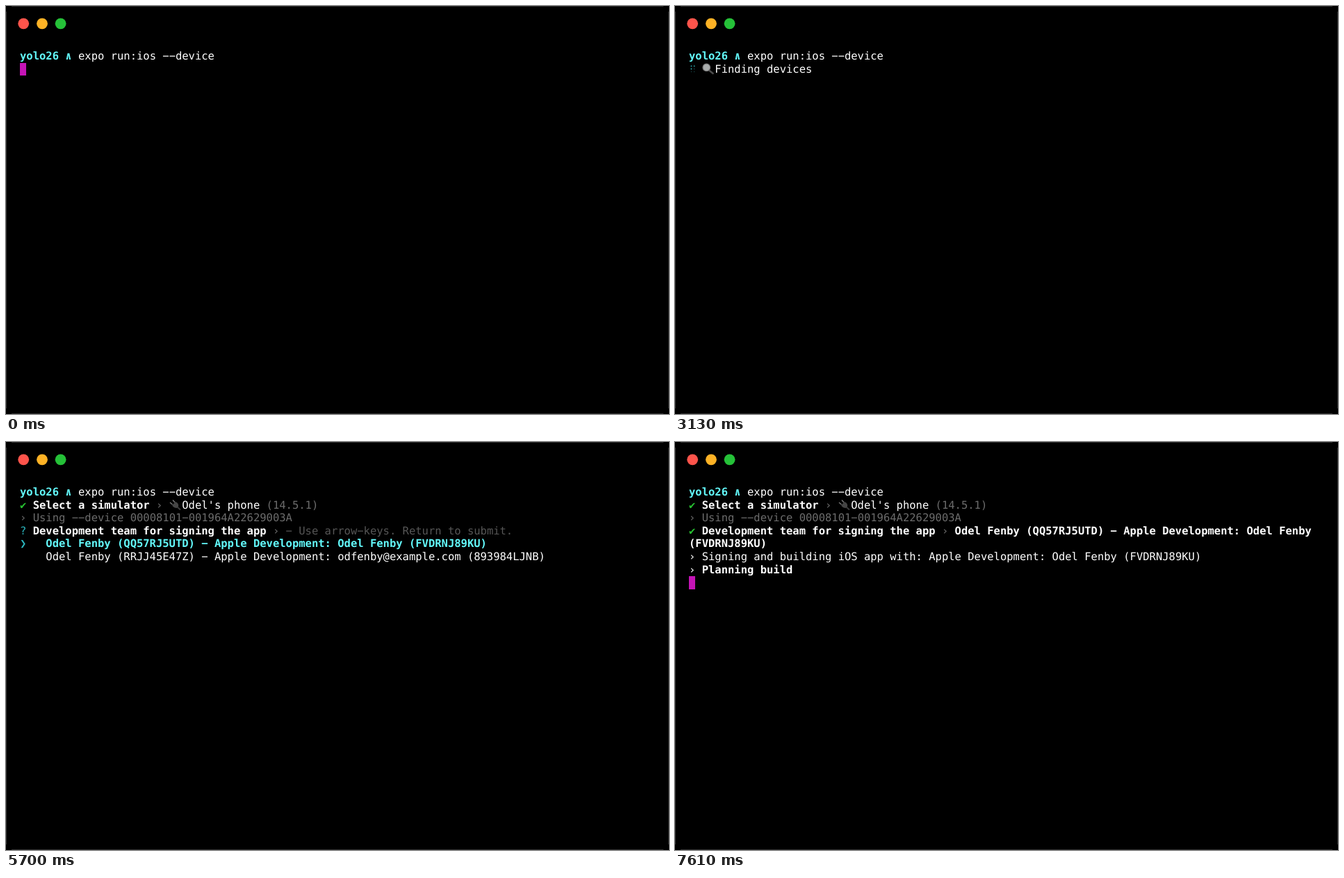
Write an HTML page that moves like this. It is 954x587 px and loops after 8 s.

```html
<!DOCTYPE html>
<html lang="en">
<head>
<meta charset="utf-8">
<title>Terminal</title>
<style>
  html, body { margin: 0; width: 100%; height: 100%; overflow: hidden; background: #000; }
  #stage { position: relative; width: 954px; height: 587px; overflow: hidden; background: #000; }
  #stage span, #stage svg { position: absolute; }
  #stage span {
    white-space: pre; color: #fff; text-rendering: geometricPrecision;
    font: 15.5px/18.6px "DejaVu Sans Mono", "DejaVu Sans", monospace;
  }
  #stage .b { font-weight: bold; }
  #stage .cyan { color: #62f8fa; }
  #stage .teal { color: #2bb5bd; }
  #stage .grey { color: #6c6c6c; }
  #stage .dim { color: #565656; }
  #stage .green { color: #27c031; }
  #stage .cursor { width: 9.3px; height: 18.6px; background: #c514b6; }
</style>
</head>
<body>
<div id="stage">
  <svg width="954" height="587">
    <path d="M8 .5H946M8 586.5H946M.5 8V579M953.5 8V579" stroke="#303030"/>
    <circle cx="25.2" cy="25.3" r="7.9" fill="#fe544b"/>
    <circle cx="52" cy="25.3" r="7.9" fill="#fdb225"/>
    <circle cx="78.6" cy="25.3" r="7.9" fill="#25c138"/>
  </svg>
  <div id="screen"></div>
</div>
<script>
const LOOP = 8000, COL = 9.3318, ROW = 18.6, LEFT = 20, TOP = 62.9;
const screen = document.getElementById('screen');

const person = 'Odel Fenby';
const signer = `Apple Development: ${person} (FVDRNJ89KU)`;
const teams = [
  `${person} (QQ57RJ5UTD) - ${signer}`,
  `${person} (RRJJ45E47Z) - Apple Development: odfenby@example.com (893984LJNB)`
];
const simulators = [
  'iPhone 12 Pro Max', 'iPhone 8', 'iPhone 8 Plus', 'iPhone 11', 'iPhone 11 Pro',
  'iPhone 11 Pro Max', 'iPad Pro (9.7-inch)', 'iPad Pro (11-inch) (2nd generation)',
  'iPad Pro (12.9-inch) (4th generation)', 'iPad (8th generation)'
];

const at = (row, col) => `style="left:${LEFT + col * COL}px;top:${TOP + row * ROW}px"`;
// Wide minus glyphs stand for the terminal font's long hyphens.
const text = (row, col, str, cls = '') =>
  `<span class="${cls}" ${at(row, col)}>${str.replace(/-/g, '\u2212')}</span>`;
const cursor = row => `<span class="cursor" ${at(row, 0)}></span>`;
const icon = (row, col, body) =>
  `<svg width="19" height="19" ${at(row, col)}>${body}</svg>`;

const lens = (row, col) => icon(row, col, `
  <path d="M10 10.5L15.6 15" stroke="#4b4b4b" stroke-width="2.6" stroke-linecap="round"/>
  <circle cx="6.3" cy="6.4" r="5.3" fill="#a9adad" stroke="#777" stroke-width="1.2"/>`);
const plug = (row, col) => icon(row, col, `
  <path d="M1 5L4.5 8M5 1.5L8 5" stroke="#777" stroke-width="1.5"/>
  <path d="M4 9L9 4Q14 6 13 11L11 13Q6 13 4 9Z" fill="#454545"/>
  <path d="M11.5 11.5L16 15.5" stroke="#3c3c3c" stroke-width="2"/>`);

const CYCLE = [...'⠋⠙⠹⠸⠼⠴⠦⠧⠇⠏'].map(c => c.codePointAt(0) - 0x2800);
function spinner(row, step) {
  let dots = '';
  for (let i = 0; i < 6; i++) {
    const lit = CYCLE[step] >> i & 1;
    dots += `<circle cx="${i < 3 ? 3.5 : 7.7}" cy="${4.4 + i % 3 * 4.1}" ` +
      `r="${lit ? 0.95 : 0.7}" fill="${lit ? '#2fa9b0' : '#1c5559'}"/>`;
  }
  return icon(row, 0, dots);
}

const prompt = () => text(0, 0, 'yolo26 ∧', 'b cyan') + text(0, 9, 'expo run:ios --device');
const device = (row, col) => plug(row, col) + text(row, col + 2, `${person.split(' ')[0]}'s phone`);

const finding = step => spinner(1, step) + lens(1, 2) + text(1, 4, 'Finding devices');

const question = (row, str, done) =>
  text(row, 0, done ? '✔\uFE0E' : '?', done ? 'green' : 'teal') +
  text(row, 2, str, 'b') + text(row, str.length + 3, '›', 'grey');

const deviceList = () => question(1, 'Select a simulator') +
  text(2, 0, '❯', 'teal') + device(2, 4) + text(2, 19, '(14.5.1)', 'grey') +
  simulators.map((s, i) =>
    text(3 + i, 4, s) + text(3 + i, 5 + s.length, '(14.5)', 'grey')).join('');

const chosen = () => question(1, 'Select a simulator', true) +
  device(1, 23) + text(1, 38, '(14.5.1)', 'grey') +
  text(2, 0, '› Using --device 00008101-001964A22629003A', 'grey');

const teamTitle = 'Development team for signing the app';
const teamList = pick => question(3, teamTitle) +
  text(3, 41, '- Use arrow-keys. Return to submit.', 'dim') +
  text(4 + pick, 0, '❯', 'teal') +
  teams.map((s, i) => text(4 + i, 4, s, i === pick ? 'b cyan' : '')).join('');

function teamDone() {
  const cut = teams[0].lastIndexOf(' ');
  return question(3, teamTitle, true) +
    text(3, 41, teams[0].slice(0, cut), 'b') + text(4, 0, teams[0].slice(cut + 1), 'b');
}

function scene(t) {
  if (t < 570) return cursor(1);
  if (t < 3600) return finding((Math.floor((t - 760) / 78) + 10) % 10);
  if (t < 4170) return deviceList();
  if (t < 4430) return chosen() + cursor(3);
  if (t < 7350) return chosen() + teamList(t >= 6220 && t < 6570 ? 1 : 0);
  const out = chosen() + teamDone();
  if (t < 7390) return out + cursor(5);
  const signing = out + text(5, 0, `› Signing and building iOS app with: ${signer}`);
  if (t < 7500) return signing + cursor(6);
  return signing + text(6, 0, '›') + text(6, 2, 'Planning build', 'b') + cursor(7);
}

let shown = '';
function draw() {
  const html = prompt() + scene(performance.now() % LOOP);
  if (html !== shown) screen.innerHTML = shown = html;
  requestAnimationFrame(draw);
}
draw();
</script>
</body>
</html>
```
